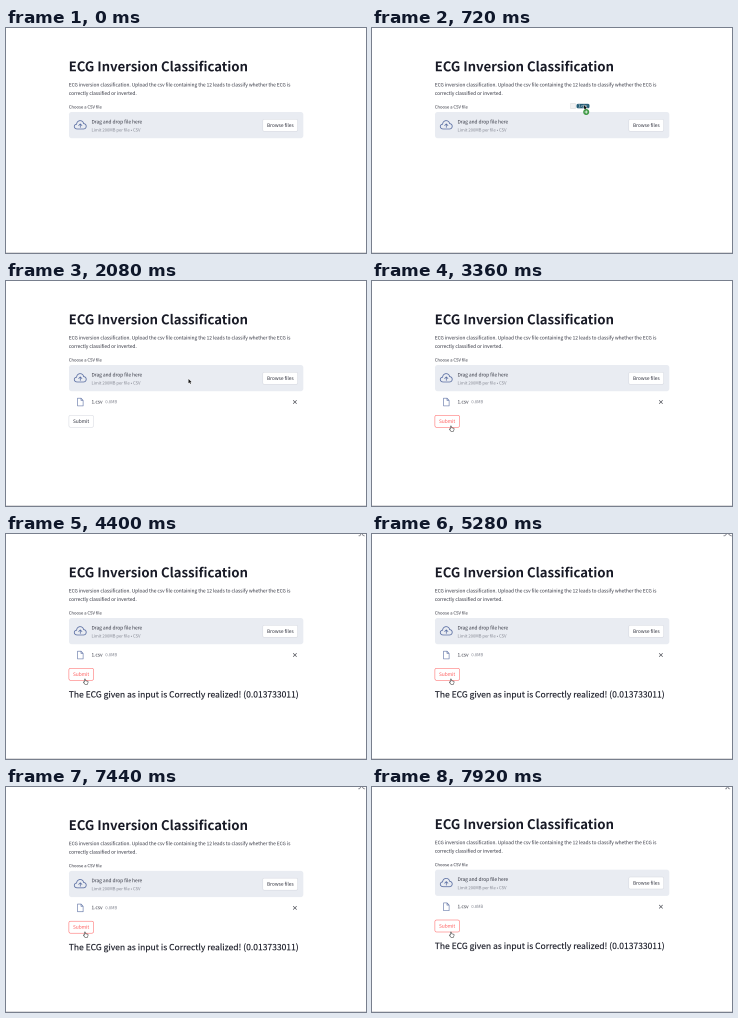
An HTML page with a canvas that plays this animation: 360x225 px, repeating every 8000 ms.

```html
<!DOCTYPE html>
<html lang="en">
<head>
<meta charset="utf-8">
<title>ECG Inversion Classification</title>
<style>
html, body { margin: 0; width: 100%; height: 100%; overflow: hidden; background: #fff; }
canvas { display: block; width: 360px; height: 225px; }
</style>
</head>
<body>
<canvas id="stage" width="360" height="225"></canvas>
<script>
const W = 360, H = 225, SCALE = 4, LOOP = 8000, STEP = 80;
const stage = document.getElementById('stage').getContext('2d');
stage.imageSmoothingQuality = 'high';

// The page is drawn large and reduced, like a scaled-down screen recording
const page = document.createElement('canvas');
page.width = W * SCALE;
page.height = H * SCALE;
const ctx = page.getContext('2d');
ctx.scale(SCALE, SCALE);

const FONT = '"Noto Sans CJK JP", "Noto Sans CJK SC", "Noto Sans CJK", "Noto Sans", sans-serif';
const INK = '#31333f', MUTED = '#858893', RED = '#ff5c5c', BLUE = '#5b6fa3', BORDER = '#d5d8e0';
const BODY = 4.78, SMALL = 4.17;

// Pointer path: [time, x, y]
const dragPath = [[80, 262, -8], [240, 258, 18], [400, 245, 50], [560, 226, 72],
  [720, 212, 78], [880, 196, 91], [1040, 185, 97], [1200, 182.5, 98]];
const movePath = [[2400, 182.5, 98], [2640, 156, 116], [2880, 108, 142],
  [3040, 84, 151], [3280, 77.7, 144.8]];

const clamp = v => Math.max(0, Math.min(1, v));
const smooth = v => { v = clamp(v); return v * v * (3 - 2 * v); };

function along(path, t) {
  let i = 0;
  while (i < path.length - 2 && t > path[i + 1][0]) i++;
  const [t0, x0, y0] = path[i], [t1, x1, y1] = path[i + 1];
  const k = clamp((t - t0) / (t1 - t0));
  return [x0 + (x1 - x0) * k, y0 + (y1 - y0) * k];
}

function text(str, x, y, size, color, { weight = 400, spacing = 0, bolder = 0 } = {}) {
  ctx.font = `${weight} ${size}px ${FONT}`;
  ctx.letterSpacing = `${spacing}px`;
  ctx.fillStyle = ctx.strokeStyle = color;
  ctx.fillText(str, x, y);
  if (bolder) {
    ctx.lineWidth = bolder;
    ctx.lineJoin = 'round';
    ctx.strokeText(str, x, y);
  }
}

function box(x, y, w, h, r, fill, stroke) {
  ctx.beginPath();
  ctx.roundRect(x, y, w, h, r);
  ctx.fillStyle = fill;
  ctx.fill();
  if (stroke) {
    ctx.strokeStyle = stroke;
    ctx.lineWidth = 0.5;
    ctx.stroke();
  }
}

function line(d, color, width) {
  ctx.strokeStyle = color;
  ctx.lineWidth = width;
  ctx.lineCap = ctx.lineJoin = 'round';
  ctx.stroke(new Path2D(d));
}

function uploader() {
  box(63, 84, 234.3, 26.2, 2.6, '#e9ecf2');
  line('M71.3 101 C67.4 101 67.4 96.4 70.6 96.2 C71 91.6 77 91.6 77.6 95.6 C81.2 95.8 81 101 77.4 101 Z', BLUE, 0.8);
  line('M74.3 99.4 V96 M72.7 97.5 L74.3 95.9 L75.9 97.5', BLUE, 0.75);
  text('Drag and drop file here', 85.5, 95.4, BODY, INK);
  text('Limit 200MB per file • CSV', 85.5, 103.5, SMALL, MUTED);
  box(256.8, 91.3, 34.8, 12, 1.4, '#fff', BORDER);
  text('Browse files', 261, 99, BODY, INK);
}

function fileRow() {
  line('M71.6 117.2 H75 L77.1 119.4 V124.9 H71.6 Z M75 117.2 V119.4 H77.1', BLUE, 0.6);
  text('1.csv', 85.5, 122.5, BODY, INK);
  text('0.8MB', 99.3, 122.3, SMALL, MUTED);
  line('M287.3 119.4 L290.5 122.6 M290.5 119.4 L287.3 122.6', '#44464f', 0.65);
}

function submitButton(hover) {
  box(62.9, 134.3, 24.6, 12, 1.6, '#fff', hover ? RED : BORDER);
  text('Submit', 67, 142, BODY, hover ? RED : INK);
}

function arrow(x, y) {
  ctx.save();
  ctx.translate(x, y);
  const p = new Path2D('M0 0 V4.3 L1 3.4 L1.7 4.9 L2.4 4.6 L1.8 3.1 H3.1 Z');
  ctx.strokeStyle = '#fff';
  ctx.lineWidth = 0.7;
  ctx.stroke(p);
  ctx.fillStyle = '#111';
  ctx.fill(p);
  ctx.restore();
}

function hand(x, y) {
  ctx.save();
  ctx.translate(x, y);
  const p = new Path2D('M0.8 0.3 Q1.5 -0.2 1.7 0.6 L1.9 2 L4 2.4 Q4.6 2.6 4.3 4 L3.6 5.6 H1.4 L-0.4 3.5 Q-0.3 2.7 0.8 3.3 Z');
  ctx.fillStyle = '#fff';
  ctx.fill(p);
  ctx.strokeStyle = '#444';
  ctx.lineWidth = 0.55;
  ctx.stroke(p);
  ctx.restore();
}

function draggedFile(x, y) {
  box(x - 13.5, y - 2.6, 5, 5.2, 0.5, '#f3f3f3', '#dddddd');
  box(x - 7.5, y - 2.2, 13, 4.5, 1.5, '#285f78');
  text('1.csv', x - 6, y + 1.3, 4, '#fff');
  arrow(x, y - 1);
  ctx.beginPath();
  ctx.arc(x + 2.2, y + 6, 3, 0, Math.PI * 2);
  ctx.fillStyle = '#3f9a45';
  ctx.fill();
  line(`M${x + 0.9} ${y + 6} h2.6 m-1.3 -1.3 v2.6`, '#fff', 0.7);
}

// Activity figure, cut off by the top edge
function runner(t) {
  const swing = Math.sin(t / 80 * 1.25);
  line(`M355.5 -1 L${353.5 - swing} 1.8 h-1 M355.5 -1 L${357.6 + swing} 1.6 l1.2 0.3`, '#777983', 0.75);
}

function draw(t) {
  ctx.fillStyle = '#fff';
  ctx.fillRect(0, 0, W, H);
  ctx.fillStyle = '#dcdcde';
  ctx.fillRect(0, 224, W, 1);

  ctx.save();
  ctx.translate(0, -1.3 * smooth((t - 7360) / 400));
  text('ECG Inversion Classification', 62.7, 43.2, 13.1, '#181a26', { weight: 700, spacing: 0.03 });
  text('ECG inversion classification. Upload the csv file containing the 12 leads to classify whether the ECG is', 62.8, 58.5, BODY, INK);
  text('correctly classified or inverted.', 62.8, 67, BODY, INK);
  text('Choose a CSV file', 62.8, 80.5, SMALL, INK);
  uploader();
  if (t >= 1360) fileRow();
  if (t >= 1920) submitButton(t >= 2960);
  if (t >= 4400) {
    text('The ECG given as input is Correctly realized! (0.013733011)', 62.8, 163.4, 8.45, '#262833',
      { weight: 500, spacing: 0.04, bolder: 0.2 });
  }
  ctx.restore();

  if ((t >= 1840 && t < 2080) || t >= 3520) runner(t);

  if (t >= 80 && t < 1200) draggedFile(...along(dragPath, t));
  else if (t >= 1200) {
    const [x, y] = along(movePath, t);
    if (t >= 2960) hand(x, y);
    else arrow(x, y);
  }
  stage.drawImage(page, 0, 0, W, H);
}

function frame(now) {
  draw(Math.floor((now % LOOP) / STEP) * STEP);
  requestAnimationFrame(frame);
}
requestAnimationFrame(frame);
</script>
</body>
</html>
```
